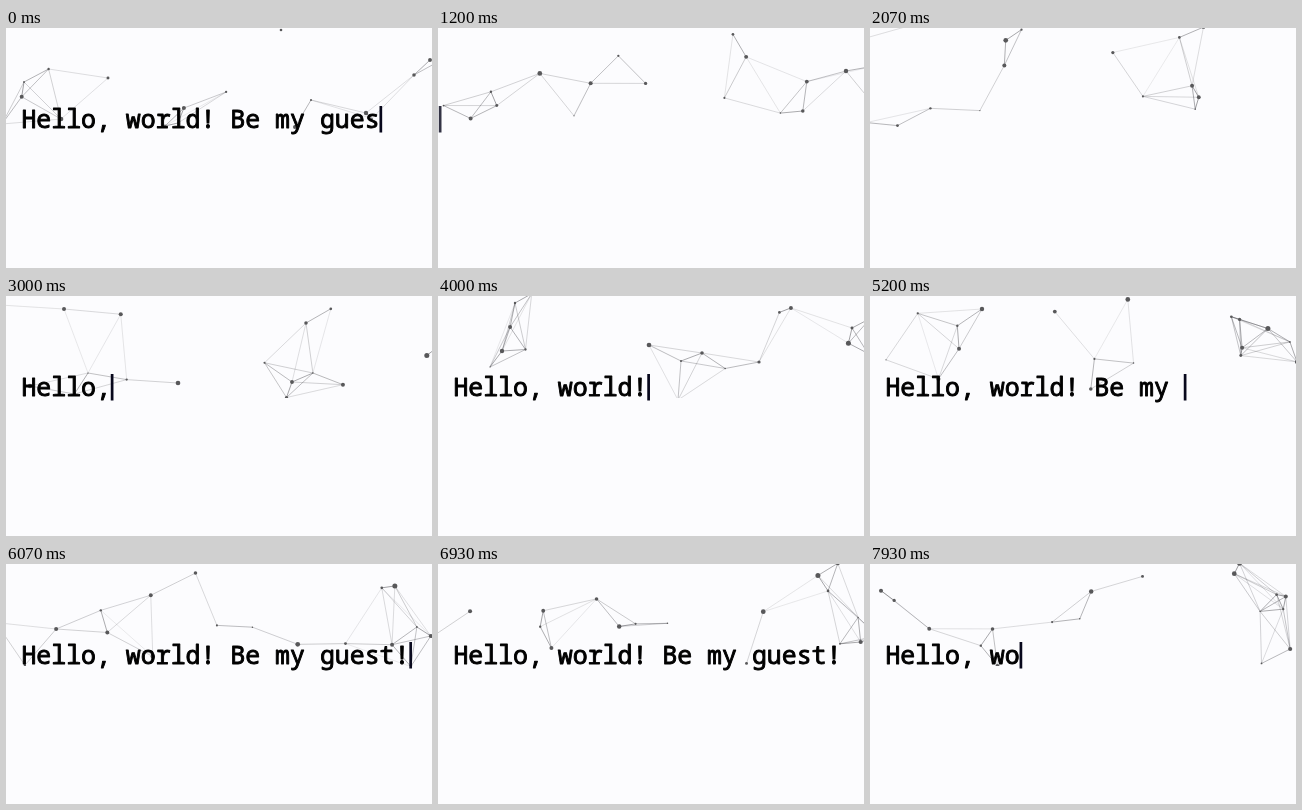
Animation of 426x240 px, one loop 8 s. Source, as an HTML page with a canvas:

```html
<!DOCTYPE html>
<html lang="en">
<head>
<meta charset="utf-8">
<title>Typing greeting</title>
<style>
  html, body { margin: 0; height: 100%; overflow: hidden; background: #fcfcfe; }
  canvas { display: block; width: 100vw; height: 100vh; }
</style>
</head>
<body>
<canvas></canvas>
<script>
const W = 426, H = 240, LOOP = 8000;
const canvas = document.querySelector('canvas');
const ctx = canvas.getContext('2d');
const ratio = window.devicePixelRatio || 1;
canvas.width = W * ratio;
canvas.height = H * ratio;
ctx.scale(ratio, ratio);

const clamp = (v, lo, hi) => Math.min(hi, Math.max(lo, v));
const wrap = (v, lo, hi) => lo + (((v - lo) % (hi - lo)) + hi - lo) % (hi - lo);

function seeded(seed) {
  return () => (seed = (seed * 16807) % 2147483647) / 2147483647;
}

// Every dot drifts in a straight line and re-enters on the opposite side.
const NET_HEIGHT = 102, LINK = 70, EXTRA_DOTS = 4, MAX_SPEED = 45;

// The leading dots, largest first: x, y at time zero, velocity per second.
const leaders = [
  [452, 96, -10.4, -12.2], [55, 311, 39, -38], [-96, 305, 40, -35], [440, 29.5, -2.5, 7],
  [424, -78, -46, 18], [408, -173, -36, 30], [159, 208, 40.5, -35.5], [558, -60, -36, 23],
  [275, 2, 16.6, 3.6], [42.6, -69, 8.6, 19], [305, 72, -15.5, -1.75],
  [474, -56, -10.4, 19.6], [366, 90.5, -19.7, -4.5], [172, 95, -30, -6]
].map(([x, y, vx, vy], i, all) => ({ x, y, vx, vy, r: 2.5 - 1.9 * i / (all.length - 1) }));

const random = seeded(4711);
const extras = Array.from({ length: EXTRA_DOTS }, () => ({
  x: random() * W,
  y: random() * NET_HEIGHT,
  vx: (random() * 2 - 1) * MAX_SPEED,
  vy: (random() * 2 - 1) * MAX_SPEED,
  r: 0.6 + random() * 1.6
}));
const network = [...leaders, ...extras];

function drawNetwork(seconds) {
  const dots = network.map(d => ({
    x: wrap(d.x + d.vx * seconds, -15, W + 15),
    y: wrap(d.y + d.vy * seconds, -4, NET_HEIGHT + 4),
    r: d.r
  }));

  ctx.save();
  ctx.beginPath();
  ctx.rect(0, 0, W, NET_HEIGHT);
  ctx.clip();
  ctx.lineWidth = 0.7;
  dots.forEach((a, i) => dots.slice(i + 1).forEach(b => {
    const distance = Math.hypot(a.x - b.x, a.y - b.y);
    if (distance >= LINK) return;
    ctx.strokeStyle = `rgba(75, 75, 80, ${0.15 + 0.75 * (1 - distance / LINK)})`;
    ctx.beginPath();
    ctx.moveTo(a.x, a.y);
    ctx.lineTo(b.x, b.y);
    ctx.stroke();
  }));
  ctx.fillStyle = '#58585a';
  for (const d of dots) {
    ctx.beginPath();
    ctx.arc(d.x, d.y, d.r, 0, Math.PI * 2);
    ctx.fill();
  }
  ctx.restore();
}

// One cycle: erase, rest, type, rest.
const MESSAGE = 'Hello, world! Be my guest!';
const CYCLE = 7260, OFFSET = 100, ERASE_STEP = 45, TYPE_START = 2115, TYPE_STEP = 152;
const ERASED = MESSAGE.length * ERASE_STEP;
const TYPED = TYPE_START + MESSAGE.length * TYPE_STEP;
const FONT_SIZE = 24.88, ADVANCE = FONT_SIZE * 0.6;

function drawTyping(ms) {
  const phase = (ms + OFFSET) % CYCLE;
  const count = phase < ERASED
    ? MESSAGE.length - Math.floor(phase / ERASE_STEP)
    : clamp(Math.floor((phase - TYPE_START) / TYPE_STEP), 0, MESSAGE.length);
  const text = MESSAGE.slice(0, count);

  // A thin outline brings the regular weight up to semi-bold.
  ctx.font = `400 ${FONT_SIZE}px "Noto Sans Mono", "DejaVu Sans Mono", monospace`;
  ctx.fillStyle = ctx.strokeStyle = '#000';
  ctx.lineWidth = 0.9;
  ctx.lineJoin = 'round';
  ctx.fillText(text, 15.4, 99.8);
  ctx.strokeText(text, 15.4, 99.8);

  // The caret blinks only while resting.
  let rest = 0;
  if (phase >= TYPED) rest = phase - TYPED;
  else if (phase >= ERASED && count === 0) rest = phase - ERASED;
  ctx.globalAlpha = clamp(0.5 + 0.8 * Math.cos(rest / 700 * Math.PI * 2), 0, 1);
  ctx.fillStyle = '#08081c';
  ctx.fillRect(count ? 15.2 + count * ADVANCE : 0.8, 78, 2.7, 26.5);
  ctx.globalAlpha = 1;
}

function draw(now) {
  const ms = now % LOOP;
  ctx.fillStyle = '#fcfcfe';
  ctx.fillRect(0, 0, W, H);
  drawNetwork(ms / 1000);
  drawTyping(ms);
}

let start;
function tick(now) {
  start ??= now;
  draw(now - start);
  requestAnimationFrame(tick);
}
draw(0);
requestAnimationFrame(tick);
</script>
</body>
</html>
```
